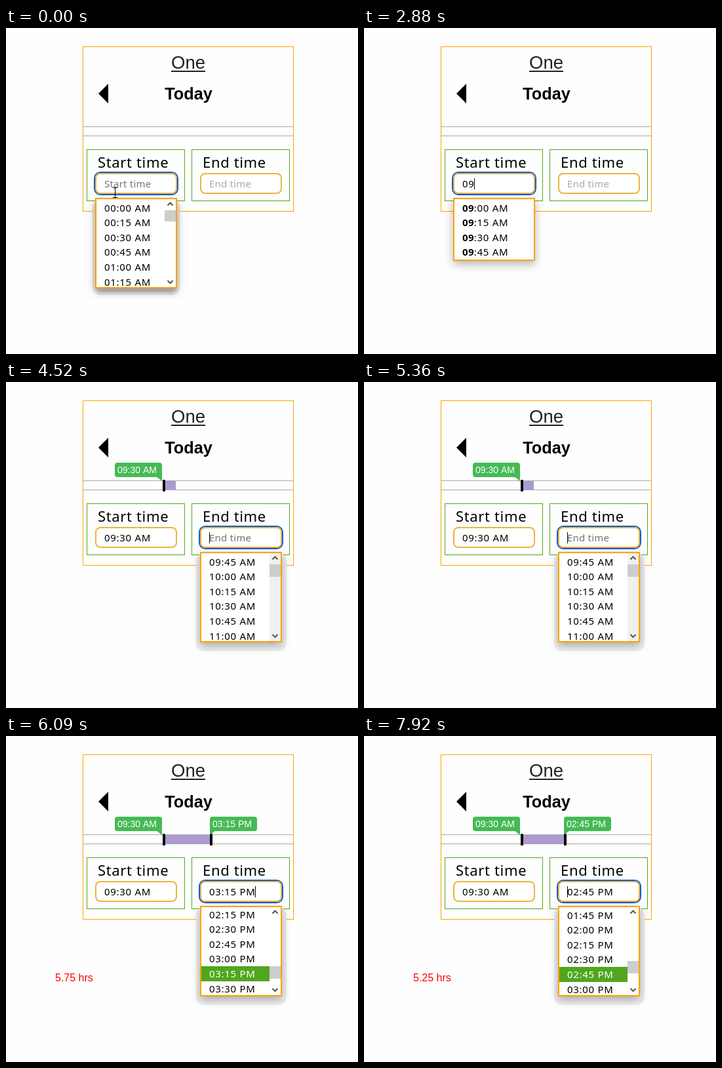
These frames come from a looping animation (537 by 497 pixels, 8 s). An HTML page with a canvas:

```html
<!DOCTYPE html>
<html>
<head>
<meta charset="utf-8">
<style>
html, body { margin: 0; width: 537px; height: 497px; overflow: hidden; background: #fefefe; }
canvas { display: block; }
</style>
</head>
<body>
<canvas id="stage" width="537" height="497"></canvas>
<script>
const ctx = document.getElementById('stage').getContext('2d');
const LOOP = 8000;
const ARIAL = '"Liberation Sans", Arial, sans-serif';
const HUMAN = '"Noto Sans", "Open Sans", sans-serif';
const ORANGE = '#ffa200', GREEN = '#51a61f', BUBBLE = '#45ba55';
const ROW = 22.6;
const OFF = 0, HEAD = 1, TAIL = 2;

// Timelines: [time in ms, value]
const startText = [[0, ''], [2460, '0'], [2730, '09'], [3520, '09:45 AM'], [4060, '09:30 AM']];
const startValue = [[0, null], [3520, 9.75], [4060, 9.5]];
const endValue = [[0, null], [5540, 16], [5720, 15.75], [5900, 15.5], [6090, 15.25], [6450, 15], [7650, 14.75]];
const boldCount = [[0, 0], [2640, 1], [2880, 2]];
const caret = [
  [0, OFF], [370, HEAD], [830, OFF], [1380, HEAD], [1920, OFF], [2460, TAIL],
  [3430, HEAD], [3520, TAIL], [3880, HEAD], [4060, TAIL], [4520, HEAD],
  [5080, OFF], [5360, HEAD], [5540, TAIL], [5630, HEAD], [5720, TAIL],
  [5810, HEAD], [5900, TAIL], [6000, HEAD], [6090, TAIL], [6270, HEAD],
  [6450, TAIL], [6630, OFF], [7190, TAIL], [7470, HEAD], [7650, TAIL],
  [7740, OFF], [7920, HEAD]
];

function at(track, t) {
  let value = track[0][1];
  for (const [time, v] of track) if (time <= t) value = v;
  return value;
}

function clock(hours) {
  const h = Math.floor(hours), m = Math.round((hours - h) * 60);
  const pad = n => String(n).padStart(2, '0');
  return pad(h > 12 ? h - 12 : h) + ':' + pad(m) + (h < 12 ? ' AM' : ' PM');
}

function fill(color, x, y, w, h) {
  ctx.fillStyle = color;
  ctx.fillRect(x, y, w, h);
}

function frame(color, x, y, w, h, line = 1) {
  ctx.strokeStyle = color;
  ctx.lineWidth = line;
  ctx.strokeRect(x + line / 2, y + line / 2, w - line, h - line);
}

function round(x, y, w, h, r) {
  ctx.beginPath();
  ctx.roundRect(x, y, w, h, r);
}

function poly(color, ...pts) {
  ctx.fillStyle = color;
  ctx.beginPath();
  for (let i = 0; i < pts.length; i += 2) ctx.lineTo(pts[i], pts[i + 1]);
  ctx.fill();
}

// Draws text and returns its advance width
function text(s, x, y, font, color, spacing = 0, align = 'left') {
  ctx.font = font;
  ctx.letterSpacing = spacing + 'px';
  ctx.textAlign = align;
  ctx.fillStyle = color;
  ctx.fillText(s, x, y);
  return ctx.measureText(s).width;
}

function timeText(s, x, y, color, bold = 0) {
  let w = 0;
  if (bold) w = text(s.slice(0, bold), x, y, '700 15px ' + HUMAN, color, 0.3);
  return w + text(s.slice(bold), x + w, y, '15px ' + HUMAN, color, 0.7);
}

function field(x, label, value, focused, caretPos) {
  frame(GREEN, x - 13, 185, 150, 79);
  text(label, x + 4, 213, '22px ' + HUMAN, '#000', 0.65);
  if (focused) {
    round(x - 1, 220, 127, 34, 9);
    ctx.strokeStyle = '#0b5cd5';
    ctx.lineWidth = 2;
    ctx.stroke();
  }
  round(x + 1, 222, 123, 30, 7);
  ctx.fillStyle = '#fff';
  ctx.fill();
  ctx.strokeStyle = '#e8b53e';
  ctx.lineWidth = 2;
  ctx.stroke();
  let w = 0;
  if (value) w = timeText(value, x + 14, 243, '#000');
  else text(label, x + 14, 243, '15px ' + HUMAN, focused ? '#757575' : '#a9a9a9', 0.2);
  if (focused && caretPos) {
    const dx = caretPos === TAIL ? Math.round(w - 0.7) : 0;
    fill('#000', x + 14 + dx, 229, 1, 17);
  }
}

function chevron(x, y, dir) {
  ctx.strokeStyle = '#555';
  ctx.lineWidth = 2;
  ctx.beginPath();
  ctx.moveTo(x - 4, y + 2 * dir);
  ctx.lineTo(x, y - 2 * dir);
  ctx.lineTo(x + 4, y + 2 * dir);
  ctx.stroke();
}

function halo(color, x, y, w, h, r) {
  ctx.fillStyle = color;
  round(x, y, w, h, r);
  ctx.fill();
}

// o: x, h, first (hours), rows, shift, picked, bold, thumb [y, h], track
function list(o) {
  ctx.save();
  ctx.shadowColor = 'rgba(0,0,0,0.3)';
  ctx.shadowBlur = 13;
  ctx.shadowOffsetY = 5;
  fill('#fff', o.x, 259, 125, o.h);
  ctx.restore();
  fill('#fff', o.x, 259, 125, o.h);
  frame(ORANGE, o.x, 259, 125, o.h, 2);
  ctx.save();
  ctx.beginPath();
  ctx.rect(o.x + 2, 261, 121, o.h - 4);
  ctx.clip();
  for (let i = 0; i < o.rows; i++) {
    const v = o.first + i / 4, y = 262.5 + o.shift + i * ROW;
    const on = v === o.picked;
    if (on) fill(GREEN, o.x + 2, Math.round(y), 121, 23);
    timeText(clock(v), o.x + 14, Math.round(y + 17), on ? '#fff' : '#000', o.bold);
  }
  if (o.thumb) {
    fill(o.track, o.x + 106, 261, 17, o.h - 4);
    fill('#cdcdcd', o.x + 106, o.thumb[0], 17, o.thumb[1]);
    chevron(o.x + 114.5, 268.5, 1);
    chevron(o.x + 114.5, 387, -1);
  }
  ctx.restore();
}

function startList(t) {
  const bold = at(boldCount, t);
  if (t < 2880) {
    halo('#e6e6e6', 132, 262, 133, 145, 12);
    halo('#cccccc', 136, 380, 125, 23, 9);
    list({ x: 136, h: 138, first: 0, rows: 6, shift: 0, bold, thumb: [278, 17], track: '#fff' });
  } else {
    list({ x: 136, h: 96, first: 9, rows: 4, shift: 0, bold, picked: at(startValue, t) });
  }
}

function endList(v) {
  halo('#efefef', 290, 261, 138, 149, 12);
  const o = { x: 296, h: 138, first: 9.75, rows: 6, shift: 0, bold: 0, thumb: [278, 19], track: '#f0f0f0' };
  if (v) {
    const up = Math.max(0, 15.75 - v);
    Object.assign(o, {
      first: 14.75 - up, shift: -3 + up * 2, picked: v,
      thumb: [359 - up * 16, 19], track: '#fff'
    });
  }
  list(o);
}

function bubble(x, v, tail) {
  halo(BUBBLE, x, 123, 72, 22, 4);
  if (tail > 0) poly(BUBBLE, x + 63, 144, x + 72, 140, x + 72, 151);
  else poly(BUBBLE, x + 9, 144, x, 140, x, 151);
  text(clock(v), x + 4, 139, '14px ' + ARIAL, '#fff');
}

function handle(x) {
  halo('#000', x - 2, 149, 4, 18, 1.5);
}

function slider(t, from, to) {
  fill('#aaa', 118, 150, 320, 1);
  fill('#aaa', 118, 164, 320, 1);
  if (!from) return;
  const a = 241 + (from - 9.5) * 12;
  const b = to ? 319 + (to - 15.75) * 12 : t < 3610 ? 373 : a + 18;
  fill('#ab9bd1', a, 151, b - a, 13);
  bubble(a - 75, from, 1);
  if (to) bubble(b - 2, to, -1);
  handle(a);
  if (to) handle(b);
}

function pointer() {
  ctx.strokeStyle = '#000';
  ctx.lineWidth = 1;
  ctx.beginPath();
  ctx.moveTo(163, 243.5);
  ctx.lineTo(170, 243.5);
  ctx.moveTo(166.5, 243);
  ctx.lineTo(166.5, 259);
  ctx.moveTo(163, 258.5);
  ctx.lineTo(170, 258.5);
  ctx.stroke();
}

function draw(t) {
  const from = at(startValue, t), to = at(endValue, t);
  const onEnd = t >= 4520, pos = at(caret, t);
  fill('#fefefe', 0, 0, 537, 497);
  frame(ORANGE, 117, 28, 322, 252);
  text('One', 278, 62, '27.5px ' + ARIAL, '#222', 0, 'center');
  fill('#222', 252, 65, 52, 2);
  text('Today', 278.5, 109, 'bold 25.3px ' + ARIAL, '#000', 0, 'center');
  poly('#000', 141, 100, 156, 85, 156, 115);
  slider(t, from, to);
  field(136, 'Start time', at(startText, t), !onEnd, pos);
  field(296, 'End time', to ? clock(to) : '', onEnd, pos);
  if (onEnd) endList(to);
  else startList(t);
  if (to) text(to - from + ' hrs', 75, 374, '16px ' + ARIAL, '#f00');
  if (t < 1220) pointer();
}

const began = performance.now();
function tick() {
  draw((performance.now() - began) % LOOP);
  requestAnimationFrame(tick);
}
tick();
</script>
</body>
</html>
```
